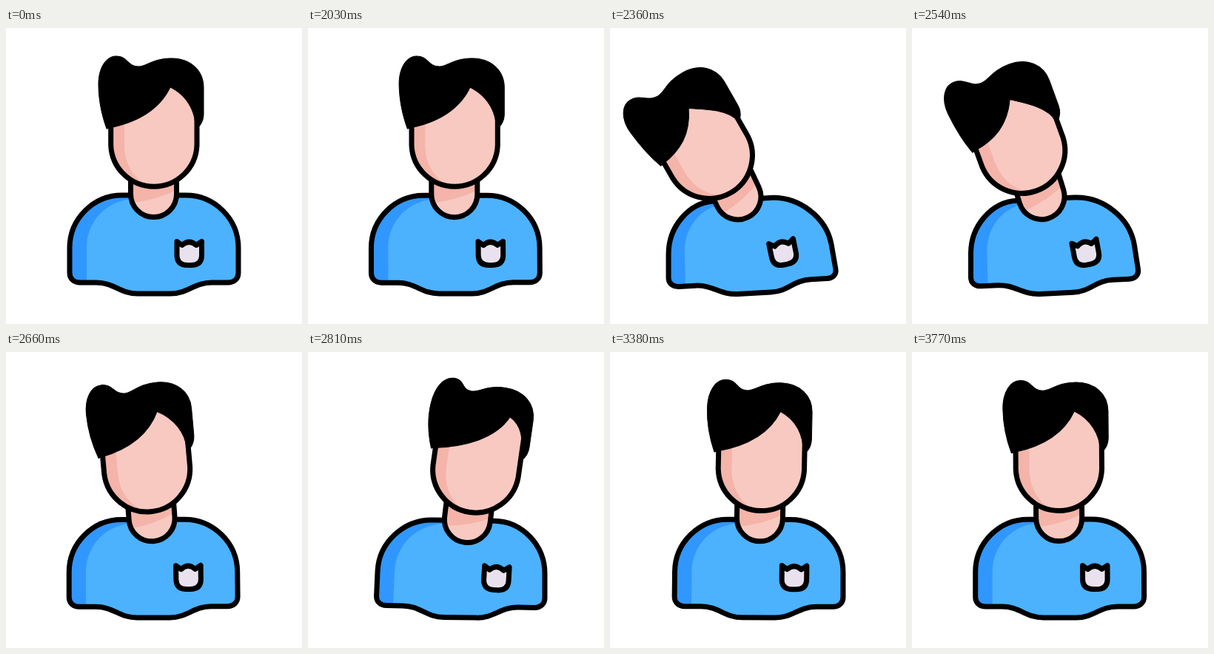
An HTML page with a canvas for the animation above (3.8 s loop, 400 px wide and 400 px high).

```html
<!DOCTYPE html>
<html lang="en">
<head>
<meta charset="utf-8">
<title>Head tilt</title>
<style>
html, body { margin: 0; width: 100%; height: 100%; overflow: hidden; background: #fff; }
canvas { display: block; width: 400px; height: 400px; }
</style>
</head>
<body>
<canvas id="stage" width="400" height="400"></canvas>
<script>
const ctx = document.getElementById('stage').getContext('2d');
const LOOP = 3800, START = 2030, STEP = 30;
const PULL = 2005, RELEASE = 2510, HALF = 300, REBOUND = 0.4, LAG = 28;
const SKIN = '#f7c9c1', SKIN_DARK = '#f4b4a9';
const SHIRT = '#4cb2fe', SHIRT_DARK = '#3097ff', BADGE = '#e9e2ee';

// Step response of a damped spring: 0 to 1, overshooting by REBOUND.
function spring(u) {
  if (u <= 0) return 0;
  const w = Math.PI / HALF, k = -Math.log(REBOUND) / HALF;
  return 1 - Math.exp(-k * u) * (Math.cos(w * u) + k / w * Math.sin(w * u));
}

// Pulled to the left, then let go.
const swing = t => spring(t - RELEASE) - spring(t - PULL);

// The body sways first and saturates; the head tilts a little later.
function pose(t) {
  const sway = Math.tanh(1.8 * swing(t));
  const tilt = 21.5 * swing(t - LAG);
  const lean = sway * (0.65 - 0.35 * sway);
  return {
    tilt, lean,
    shift: sway * (9 + 2 * sway),
    neckX: 199.5 + 27 * sway,
    neckY: 224.5 + 3.5 * Math.abs(sway),
    headX: 200 + 27 * sway + 0.3 * tilt,
    headY: 217 + 0.27 * Math.abs(tilt),
    partX: sway * (20 + 5 * sway),
    partY: 3.5 * sway * (sway - 1)
  };
}

// Each segment is a flat list: 2 numbers for a line, 6 for a curve.
function shape(segs, map = (x, y) => [x, y]) {
  const path = new Path2D();
  segs.forEach((s, i) => {
    const q = [];
    for (let j = 0; j < s.length; j += 2) q.push(...map(s[j], s[j + 1]));
    if (i === 0) path.moveTo(...q);
    else if (q.length === 2) path.lineTo(...q);
    else path.bezierCurveTo(...q);
  });
  path.closePath();
  return path;
}

function fill(path, color) { ctx.fillStyle = color; ctx.fill(path); }

// Fills the base, then an inner tone kept inside it, then the outline.
function solid(path, base, inner, tone) {
  fill(path, base);
  if (inner) {
    ctx.save();
    ctx.clip(path);
    fill(inner, tone);
    ctx.restore();
  }
  ctx.stroke(path);
}

// Draws in rest coordinates around a pivot that has moved and turned.
function posed(x, y, deg, px, py, draw) {
  ctx.save();
  ctx.translate(x, y);
  ctx.rotate(deg * Math.PI / 180);
  ctx.translate(-px, -py);
  draw();
  ctx.restore();
}

const torso = [
  [86, 297], [86, 258, 118, 226, 157, 226], [243, 226],
  [282, 226, 314, 258, 314, 297], [314, 331], [314, 339, 308, 344, 300, 344],
  [278, 344], [254, 344, 246, 359, 222, 359], [178, 359],
  [154, 359, 146, 344, 122, 344], [100, 344], [92, 344, 86, 339, 86, 331]
];
const torsoLight = [
  [109, 365], [109, 297], [109, 261, 136, 233, 172, 231], [172, 215],
  [330, 215], [330, 370]
];
const neck = new Path2D('M168.5 200H230.5V224.5A31 31 0 0 1 168.5 224.5Z');
const neckShade = new Path2D('M165 200H234V217Q205 233 165 237Z');
const face = new Path2D('M141.7 85L150 72H245L258 88V158.5A58.2 58.2 0 0 1 141.7 158.5Z');
const faceLight = new Path2D('M160 70V158C160 188 177 211 203 216L270 225V70Z');
const badge = new Path2D(
  'M231 288.5L238 293.5Q247.5 285 257 293.5L264.5 288.5V307Q264.5 320.5 250 320.5H245.5Q231 320.5 231 307Z');

// The parting slides across the head as it turns.
function hair(dx, dy) {
  const lobe = dx * 0.3;
  return shape([
    [136, 136], [129, 117, 125, 96, 125 + lobe / 2, 76],
    [125 + lobe, 54, 135 + lobe, 38, 149 + lobe, 38],
    [165 + lobe, 38, 164, 52, 179, 52], [190, 52, 198, 41, 224, 41],
    [249, 41, 267, 57, 267, 80], [267, 116], [267, 124, 264, 130, 260, 134], [256, 134],
    [256 + dx * 0.2, 112 + dy * 0.6, 244 + dx * 0.8, 91 + dy * 1.8, 222 + dx, 80 + dy],
    [207 + dx, 112 + dy, 175 + dx * 0.4, 128 + dy * 0.4, 140, 135]
  ]);
}

function render(t) {
  const p = pose(t);
  // Shears the shoulders on the trailing side while the hem stays put.
  const bend = (x, y) => {
    const up = 344 - y, side = p.lean < 0 ? x - 86 : 314 - x;
    const give = Math.min(1, Math.max(0, side / 140));
    return [
      x + p.shift + 0.17 * p.lean * give * up,
      344 - up * (1 - 0.05 * Math.abs(p.lean)) + 0.055 * p.lean * (x - 200)
    ];
  };
  ctx.fillStyle = '#fff';
  ctx.fillRect(0, 0, 400, 400);
  ctx.strokeStyle = '#000';
  ctx.lineWidth = 7;
  ctx.lineJoin = ctx.lineCap = 'round';

  solid(shape(torso, bend), SHIRT_DARK, shape(torsoLight, bend), SHIRT);
  posed(...bend(247.5, 303), 12 * p.lean, 247.5, 303, () => solid(badge, BADGE));
  posed(p.neckX, p.neckY, 0.85 * p.tilt, 199.5, 224.5, () => solid(neck, SKIN, neckShade, SKIN_DARK));
  posed(p.headX, p.headY, p.tilt, 200, 217, () => {
    solid(face, SKIN_DARK, faceLight, SKIN);
    const locks = hair(p.partX, p.partY);
    fill(locks, '#000');
    ctx.lineWidth = 1;
    ctx.stroke(locks);
  });
}

function tick() {
  const t = performance.now() % LOOP;
  render(t < START ? 0 : START + Math.floor((t - START) / STEP) * STEP);
  requestAnimationFrame(tick);
}
tick();
</script>
</body>
</html>
```
